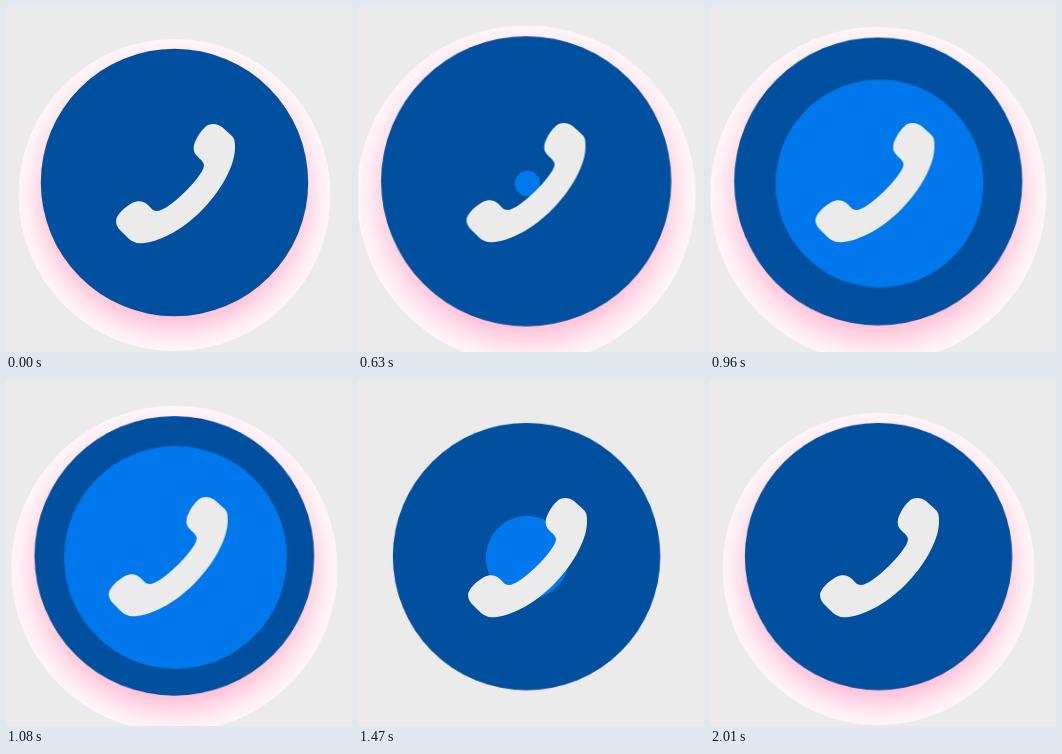
An HTML page without scripts for the animation above (2.4 s loop, 346 px wide and 346 px high).

```html
<!DOCTYPE html>
<html lang="en">
<head>
<meta charset="utf-8">
<title>Ringing call button</title>
<style>
  html, body { margin: 0; width: 100%; height: 100%; overflow: hidden; background: #ebebeb; }
  svg { display: block; width: 100%; height: 100%; }

  .button, .shadow, .ripple, .ring, .phone { animation: 2400ms linear infinite; }
  .button { animation-name: swell; transform-origin: 172px 191px; }
  .shadow { animation-name: glow; transform-origin: 168.5px 189px; }
  .ripple { animation-name: fill; transform-origin: 169.5px 177.5px; }
  .ring   { animation-name: pulse; transform-origin: 168.5px 177px; }
  .phone  { animation-name: sway; }

  @keyframes swell {
    0%, 8.3% { transform: scale(1); }
    12.5% { transform: scale(1.004); }
    18.75% { transform: scale(1.035); }
    30% { transform: scale(1.11); }
    32.3% { transform: scale(1.125); }
    33.75% { transform: scale(1.117); }
    45% { transform: scale(1.046); }
    52.5% { transform: scale(1.008); }
    55.4%, 100% { transform: scale(1); }
  }
  @keyframes glow {
    0%, 53.75% { transform: none; opacity: 1; }
    60%, 62% { transform: translateY(-12px) scale(.85); opacity: 0; }
    73.5%, 100% { transform: none; opacity: 1; }
  }
  /* Half a sine wave: out, then back */
  @keyframes fill {
    0%, 24.7% { transform: scale(0); animation-timing-function: cubic-bezier(.39, .575, .565, 1); }
    45.75% { transform: scale(1); animation-timing-function: cubic-bezier(.47, 0, .745, .715); }
    66.75%, 100% { transform: scale(0); }
  }
  @keyframes pulse {
    0%, 62% { transform: scale(.797); fill: #ffc4dc; opacity: 1; }
    73.75% { transform: scale(1); fill: #fff0f5; opacity: 1; }
    80% { transform: scale(1.107); fill: #fff8fb; opacity: 1; }
    83%, 100% { transform: scale(1.16); fill: #fff8fb; opacity: 0; }
  }
  @keyframes sway {
    0%, 8.3% { transform: none; }
    18.75% { transform: translate(-2px, -1px); }
    33.75% { transform: translate(-1px, -1px); }
    45% { transform: translate(-7.3px, -1px); }
    54%, 100% { transform: none; }
  }
</style>
</head>
<body>
<svg viewBox="0 0 346 346">
  <defs>
    <radialGradient id="pink">
      <stop offset=".76" stop-color="#ffbdd6"/>
      <stop offset=".87" stop-color="#ffdce9"/>
      <stop offset=".95" stop-color="#fff0f5"/>
      <stop offset="1" stop-color="#fff6f9"/>
    </radialGradient>
  </defs>
  <circle class="ring" cx="168.5" cy="177" r="167.5"/>
  <g class="button">
    <circle class="shadow" cx="168.5" cy="189" r="156" fill="url(#pink)"/>
    <circle cx="168.5" cy="176.5" r="133.7" fill="#00509f"/>
  </g>
  <circle class="ripple" cx="169.5" cy="177.5" r="111.5" fill="#0077ea"/>
  <path class="phone" fill="#ebebeb" d="M110 215C110 209 119 201 126 197C132 194 138 195 142 199
    C145 202 147 205 151 205C162 205 196 172 198 160C198 156 195 154 191 150C187 146 187 141 189 136
    C192 129 197 122 202 119C207 117 212 118 216 121L226 130C229 133 229 137 229 142
    C229 158 217 182 198 202C180 221 157 235 138 237C131 238 126 236 122 232L113 223
    C111 220 110 218 110 215Z"/>
</svg>
</body>
</html>
```
